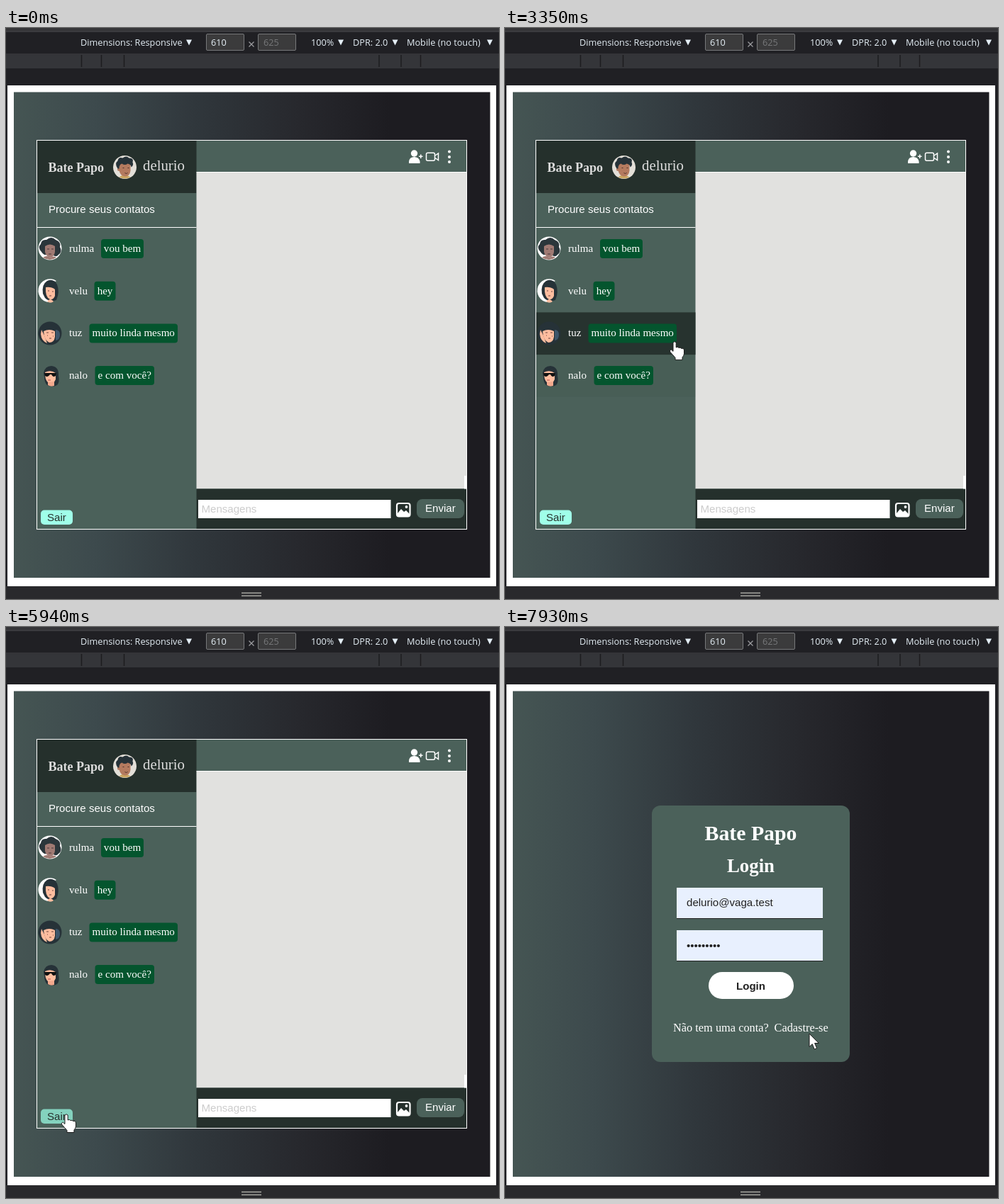
Write an HTML page that moves like this. It is 695 px wide and 806 px high and loops after 8000 ms.

```html
<!DOCTYPE html>
<html lang="pt-BR">
<head>
<meta charset="utf-8">
<title>Bate Papo</title>
<style>
  html, body { margin: 0; width: 100%; height: 100%; overflow: hidden; background: #202024; }
  svg { display: block; width: 695px; height: 806px; }
  text { white-space: pre; }
  .ui { font: 12.7px "Open Sans", sans-serif; fill: #e4eef5; }
  .sans { font: 15.07px "Liberation Sans", Arial, sans-serif; }
  .serif { font: 15.07px "Liberation Serif", "Times New Roman", serif; fill: #fff; }
  .bold { font-weight: bold; }
  .mid { text-anchor: middle; }
</style>
</head>
<body>
<svg viewBox="0 0 695 806">
  <defs>
    <linearGradient id="night">
      <stop offset="0" stop-color="#455553"/>
      <stop offset=".17" stop-color="#3d4a4d"/>
      <stop offset=".38" stop-color="#30373c"/>
      <stop offset=".6" stop-color="#27282d"/>
      <stop offset=".79" stop-color="#1d1c21"/>
    </linearGradient>
  </defs>

  <!-- Browser device toolbar -->
  <rect width="695" height="806" fill="#202024"/>
  <rect width="695" height="5" fill="#353538"/>
  <rect y="4.5" width="695" height="1" fill="#4b4b4e"/>
  <rect y="36.5" width="695" height="1" fill="#4b4b4e"/>
  <rect y="37.5" width="695" height="19.5" fill="#343539"/>
  <path d="M106.5 38v17M134.500 38v17M166.500 38v17M526 38v17M557 38v17M584.500 38v17" stroke="#1c1c1f" stroke-width="1.5"/>
  <g class="ui">
    <text x="105" y="25">Dimensions: Responsive</text>
    <g fill="#3b3b3c" stroke="#77787a">
      <rect x="282.500" y="8.500" width="53" height="23" rx="1.500"/>
      <rect x="355.500" y="8.500" width="53" height="23" rx="1.500"/>
    </g>
    <text x="289" y="25">610</text>
    <text x="363" y="25" fill="#77787a">625</text>
    <path d="M342.500 19.500l7 7m0-7l-7 7" stroke="#9a9b9e" stroke-width="1.300"/>
    <text x="430" y="25">100%</text>
    <text x="489" y="25">DPR: 2.0</text>
    <text x="565" y="25">Mobile (no touch)</text>
    <path d="M254 16.500h8l-4 8zM468 16.500h8l-4 8zM544.500 16.500h8l-4 8zM678 16.500h8l-4 8z"/>
  </g>

  <!-- Page -->
  <rect x="2" y="81" width="689" height="707" fill="#fff"/>
  <rect x="11" y="90.500" width="671.500" height="685.500" fill="url(#night)"/>
  <rect y="788" width="695" height="18" fill="#29292c"/>
  <path d="M332 797.500h28M332 801.500h28" stroke="#a9a9a2" stroke-width="1.500"/>

  <g id="chat">
    <rect x="43.500" y="158.500" width="606" height="549" fill="#4b615a"/>
    <rect x="44" y="159" width="224.500" height="74" fill="#25302c"/>
    <rect x="268.500" y="203.500" width="381" height="447" fill="#e1e1df"/>
    <rect x="268.500" y="650.500" width="381" height="57" fill="#25302c"/>
    <path d="M44 281.500h224.500M268.500 203.500h381" stroke="#fff"/>
    <rect x="646" y="632" width="3" height="18.500" fill="#fff"/>
    <text class="serif bold" x="59.500" y="203" style="font-size:18px;fill:#dcdcdc">Bate Papo</text>
    <text class="serif" x="193" y="201" style="font-size:20.8px;fill:#dcdcdc">delurio</text>
    <g transform="translate(167.500 196.500)">
      <circle r="16.500" fill="#e3dfd8"/>
      <path d="M-8 14Q-1 8 8 14Q0 18-8 14Z" fill="#c9a45f"/>
      <path d="M-8-6H8V5Q7 13 0 13Q-7 12-8 4Z" fill="#b47a5f"/>
      <circle cx="-8" cy="3" r="2.500" fill="#b47a5f"/>
      <path d="M-10 2Q-15-5-10-9Q-9-15-3-13Q2-17 6-13Q13-13 11-7Q13-3 9 0Q9-4 4-5Q0-2-4-5Q-8-4-8 2Z" fill="#263238"/>
      <path d="M-3 1h2M4 1h2M0 8q2 2 4 0" stroke="#4c302a" fill="none"/>
    </g>
    <text class="sans" x="60" y="261" fill="#fff">Procure seus contatos</text>
    <g id="rows"></g>

    <g transform="translate(62 311)">
      <circle r="16.500" fill="#fff"/>
      <path d="M-12 5Q-18-1-13-6Q-12-13-5-12Q2-18 8-12Q16-9 14-2Q18 5 12 9Q9 13 5 10L-5 9Q-9 10-12 5Z" fill="#2b363b"/>
      <path d="M-7-3Q0-8 7-3V5Q6 12 0 13Q-6 11-7 5Z" fill="#a07a73"/>
      <path d="M-10 13Q-4 9 0 13Q6 10 9 13Q0 19-10 13Z" fill="#a07a73"/>
      <path d="M-4 1h3M2 1h3M-2 8h4" stroke="#46363a"/>
    </g>
    <g transform="translate(62 371)">
      <path d="M9-14A16.500 16.500 0 1 0 3 16Q-7 9-8-4Z" fill="#fff"/>
      <path d="M-10 4Q-12-9-4-14Q5-18 10-9Q14 1 9 13Q0 17-7 10Z" fill="#263238"/>
      <path d="M-6-5Q2-6 7-2V7Q5 13 0 12Q-7 9-6-5Z" fill="#ffbd9f"/>
      <path d="M-4 15Q0 9 5 15Q1 18-4 15Z" fill="#ffbd9f"/>
      <path d="M-3 0h2M3 1h2M-1 7h3" stroke="#6d4440"/>
    </g>
    <g transform="translate(62 431)">
      <circle r="16.500" fill="#263238"/>
      <path d="M-9-3Q-1-7 7-3V5Q6 13-1 13Q-8 10-9-3Z" fill="#ffbd9f"/>
      <path d="M-12-5l4 8 4 11q-8-3-9-13z" fill="#ffbd9f"/>
      <path d="M8-5q6 0 6 7t-6 8z" fill="#3d566b"/>
      <path d="M-5-1h3M2-1h3M-4 3h1M4 4h1M-1 7h3" stroke="#70463f"/>
    </g>
    <g transform="translate(63 491)">
      <path d="M-10-4Q-8-14 1-14Q12-13 11 0Q13 9 9 13Q2 17-5 13Q-9 9-9 2Z" fill="#263238"/>
      <path d="M-8-5Q0-9 7-4V5Q4 12-1 11Q-7 9-8-1Z" fill="#ffbd9f"/>
      <path d="M-4 9L5 8V14Q0 16-4 13Z" fill="#f3a98d"/>
      <path d="M-9-4H8L7 0Q3 3 1-2H-1Q-4 3-8 0Z" fill="#111"/>
      <path d="M-4 6h4" stroke="#b84e4e"/>
    </g>

    <rect id="exit" x="49" y="680.500" width="45" height="20.500" rx="5"/>
    <text class="sans" x="58" y="696" fill="#25302c">Sair</text>

    <g fill="#fff">
      <circle cx="575.500" cy="177" r="4.700"/>
      <path d="M568 191v-3q1-6 7.500-6t8 6v3zM582 180.500h2v-2h1.500v2h2v1.500h-2v2h-1.500v-2h-2z"/>
      <circle cx="625" cy="174.500" r="2"/><circle cx="625" cy="182" r="2"/><circle cx="625" cy="189" r="2"/>
    </g>
    <path d="M594.500 176.200h8q2 0 2 2v7q0 2-2 2h-8q-2 0-2-2v-7q0-2 2-2zM605 180l4.500-3v9.500l-4.500-3" fill="none" stroke="#fff" stroke-width="1.500"/>

    <rect x="271" y="666" width="271.500" height="26" fill="#fff"/>
    <text class="sans" x="275.500" y="684" fill="#ccc">Mensagens</text>
    <rect x="551" y="671" width="18.500" height="18.500" rx="3" fill="#25302c" stroke="#fff" stroke-width="2.200"/>
    <path d="M552 685l5-6 4 4 3-2 5 5v3h-17z" fill="#fff"/>
    <circle cx="564.500" cy="676" r="1.900" fill="#fff"/>
    <rect x="579" y="665" width="67" height="27" rx="8" fill="#4b615a"/>
    <text class="sans" x="591" y="683" fill="#fff">Enviar</text>
    <rect x="43.500" y="158.500" width="606" height="549" fill="none" stroke="#fff"/>
  </g>

  <g id="login">
    <rect x="207" y="252" width="279" height="362" rx="12" fill="#4b615a"/>
    <text class="serif bold mid" x="346.500" y="301" style="font-size:29.8px">Bate Papo</text>
    <text class="serif bold mid" x="346.500" y="346" style="font-size:26.8px">Login</text>
    <g class="field">
      <rect x="242" y="368" width="206" height="43"/>
      <rect x="242" y="428" width="206" height="43"/>
    </g>
    <path d="M242 411.500h206M242 471.500h206" stroke="#222"/>
    <text id="email" class="sans" x="256" y="394" fill="#222"></text>
    <text id="password" class="sans" x="256" y="455" fill="#222"></text>
    <rect x="287" y="487" width="120" height="38" rx="19" fill="#fff"/>
    <text class="sans bold mid" x="346.500" y="512" fill="#222">Login</text>
    <text class="serif" x="237" y="571" style="font-size:16.35px">Não tem uma conta?</text>
    <text class="serif" x="379.500" y="571" style="font-size:16.35px">Cadastre-se</text>
  </g>

  <g id="cursor" fill="#fff" stroke="#1b1b1b" stroke-width="1" stroke-linejoin="round">
    <path id="arrow" d="M0 0V18.500L4.200 14.700 7.200 22 10.600 20.500 7.600 13.500H13.300Z"/>
    <path id="hand" d="M-2 1Q0-1.500 2.200 1V8Q4.500 6.500 6 8.500Q8.500 7.500 9.500 9.500Q13 8.500 13.500 12V17Q13 20 11 22V25.500H1V22.500L-6 14.500Q-7.500 11.500-4.500 11.200L-2 13.500Z"/>
  </g>
</svg>
<script>
const LOOP = 8000, FADE = 300, LOGIN_AT = 6690, AUTOFILL_AT = 6890;
const $ = id => document.getElementById(id);
const clamp = v => Math.max(0, Math.min(1, v));
const show = (id, on) => $(id).style.display = on ? '' : 'none';

// name, message, bubble x, bubble width, hover intervals
const contacts = [
  ['rulma', 'vou bem', 134, 60, [[4150, 4800]]],
  ['velu', 'hey', 124.5, 30, [[3780, 4150], [4800, 4990]]],
  ['tuz', 'muito linda mesmo', 117.5, 124.500, [[3070, 3780], [4990, 5190]]],
  ['nalo', 'e com você?', 125.5, 83.500, [[2600, 3070], [5190, 5430]]]
];
$('rows').innerHTML = contacts.map(([name, message, x, width], i) => {
  const top = 282 + i * 59.7;
  return `<rect class="hover" x="44" y="${top}" width="224.5" height="59.7" fill="#25302c"/>
    <text class="serif" x="89" y="${top + 34}">${name}</text>
    <rect x="${x}" y="${top + 16}" width="${width}" height="27" rx="4" fill="#04552e"/>
    <text class="serif mid" x="${x + width / 2}" y="${top + 34}">${message}</text>`;
}).join('');
const hovers = document.querySelectorAll('.hover');

// time, x, y of the pointer
const path = [
  [180, 618, 796], [420, 500, 720], [680, 320, 625], [940, 212, 573],
  [1350, 227, 555], [1680, 226, 555], [1960, 213, 561], [2230, 213, 561],
  [2600, 222, 518], [3000, 236, 480], [3350, 239, 443], [3780, 240, 400],
  [4150, 240, 341], [4470, 240, 316], [4680, 240, 315], [4800, 239, 342],
  [5190, 222, 461], [5430, 189, 522], [5520, 178, 563], [5940, 85, 688],
  [6210, 76, 689], [6690, 76, 689], [6900, 84, 687], [7170, 170, 692],
  [7440, 280, 684], [7680, 378, 625], [7930, 429, 574], [8000, 429, 574]
];

function pointerAt(t) {
  const i = Math.max(1, path.findIndex(p => p[0] > t));
  const [t0, x0, y0] = path[i - 1], [t1, x1, y1] = path[i];
  const k = clamp((t - t0) / (t1 - t0));
  return [x0 + (x1 - x0) * k, y0 + (y1 - y0) * k];
}

function render(t) {
  const login = t >= LOGIN_AT, filled = t >= AUTOFILL_AT;
  const overExit = t >= 5870 && !login;
  const overRow = t >= 2600 && t < 5430;
  show('chat', !login);
  show('login', login);

  contacts.forEach(([, , , , spans], i) => {
    const level = spans.reduce((sum, [on, off]) =>
      sum + clamp((t - on) / FADE) * (t < off ? 1 : clamp(1 - (t - off) / FADE)), 0);
    hovers[i].setAttribute('opacity', clamp(level));
  });
  $('exit').setAttribute('fill', overExit ? '#84d2be' : '#a0ffe9');

  document.querySelector('.field').setAttribute('fill', filled ? '#e8f0fe' : '#fff');
  $('email').textContent = filled ? 'delurio@vaga.test' : 'Email';
  $('password').textContent = filled ? '•'.repeat(9) : 'Senha';

  show('cursor', t >= 180);
  show('hand', overRow || overExit);
  show('arrow', !overRow && !overExit);
  $('cursor').setAttribute('transform', `translate(${pointerAt(t)})`);
}

function tick() {
  render(performance.now() % LOOP);
  requestAnimationFrame(tick);
}
tick();
</script>
</body>
</html>
```
